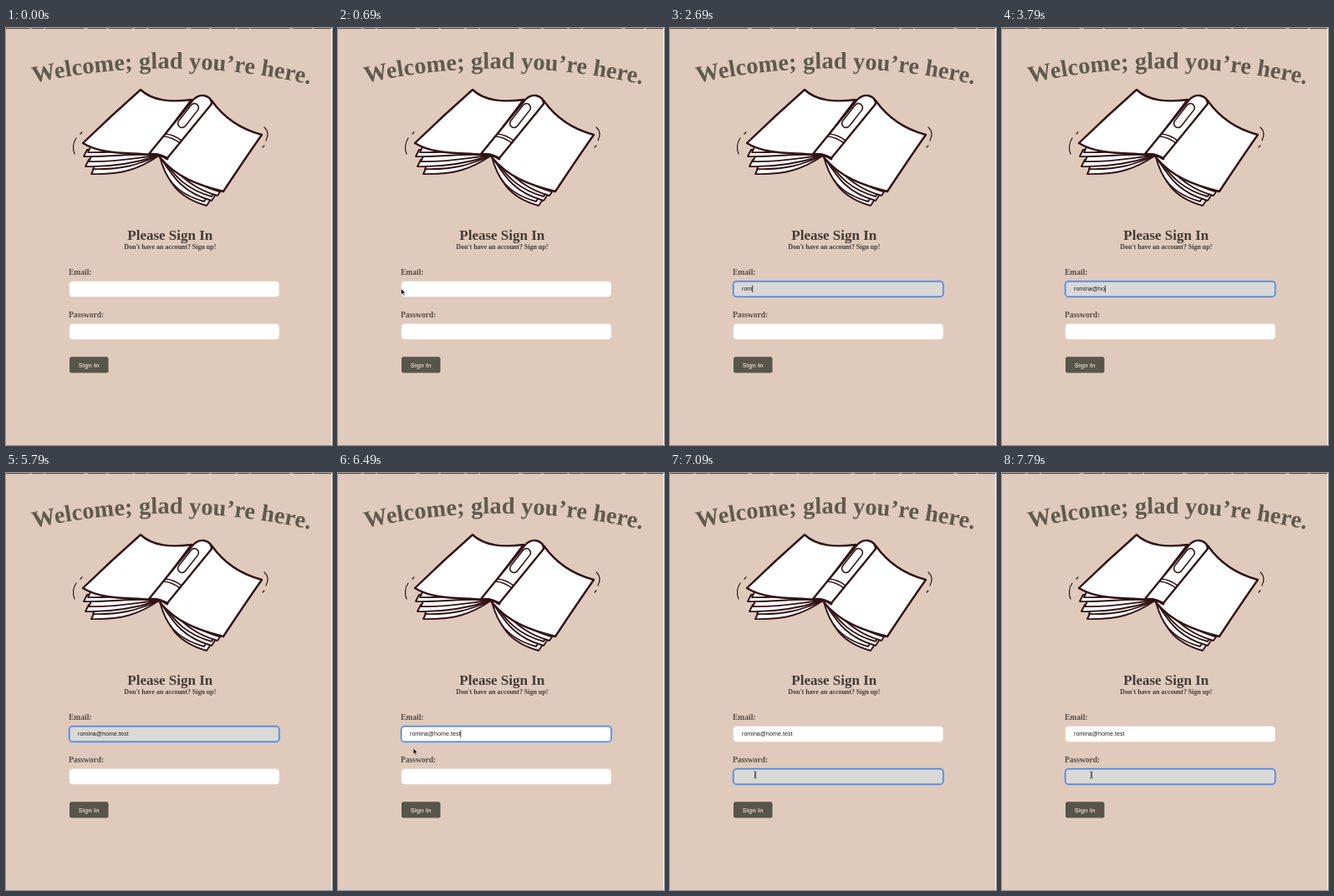
An HTML page that plays this animation: 390x500 px, repeating every 8 s.

```html
<!DOCTYPE html>
<html lang="en">
<head>
<meta charset="utf-8">
<title>Sign in</title>
<style>
  html, body { margin: 0; width: 100%; height: 100%; overflow: hidden; background: #dfcabc; }
  svg { display: block; width: 390px; height: 500px; }
  text { font-family: "Liberation Serif", "Times New Roman", serif; font-weight: 700; fill: #443d37; }
  .title { font-size: 28.3px; fill: #5f5a4d; letter-spacing: .1px; }
  .label { font-size: 9.5px; fill: #584e47; }
  .sans { font-family: "Liberation Sans", Arial, sans-serif; }
  .value { font-size: 7.15px; font-weight: 400; fill: #222; }
  .book { stroke: #321315; stroke-width: 2.4; stroke-linejoin: round; stroke-linecap: round; fill: #fff; }
  .line { fill: none; }
</style>
</head>
<body>
<svg viewBox="0 0 390 500">
  <defs><path id="arc" d="M33 66Q196 30 366 68"/></defs>
  <rect width="390" height="500" fill="#dfcabc"/>
  <path d="M0 .4H389" stroke="#9b8a80" stroke-width=".9"/>
  <path d="M0 .4H389" stroke="#4b3a33" stroke-width="1" stroke-dasharray="28 3 14 2 46 5 22 3"/>
  <rect x="389" width="1" height="500" fill="#fff"/>

  <text class="title"><textPath href="#arc">Welcome; glad you’re here.</textPath></text>

  <g class="book">
    <g id="stack" stroke-width="1.9"></g>
    <path d="M161 74C176 88 198 89 222 86L172 152C150 149 116 153 92 138Q126 105 161 74Z"/>
    <path d="M246 87C258 104 276 120 306 128Q285 158 260 196C228 188 203 178 184 155Z"/>
    <path d="M171 151L224 86Q230 80 237 81Q246 83 246 91L193 156Q182 150 171 151Z"/>
    <path class="line" stroke-width="3" d="M172 152Q183 150 193 157"/>
    <g stroke-width="1.6">
      <rect class="line" x="-17" y="-5" width="34" height="10" rx="5" transform="translate(218 105) rotate(-52)"/>
      <path class="line" d="M191 127Q201 128 210 135M189 130Q199 131 208 138"/>
    </g>
    <path class="line" stroke-width="1.2" d="M84 132Q78 141 82 151M89 127L91 125M309 119Q316 125 311 135M309 141L307 143"/>
  </g>

  <text x="196.3" y="253.6" font-size="17" text-anchor="middle">Please Sign In</text>
  <text x="196.3" y="265" font-size="7.95" text-anchor="middle">Don't have an account? Sign up!</text>

  <rect id="halo" x="75.2" width="252.2" height="19.6" rx="4.5" fill="none" stroke="#b4c3e4" stroke-width="2.4"/>
  <text class="label" x="75" y="296.3">Email:</text>
  <rect id="email" x="75.8" y="303.8" width="251" height="18.4" rx="4"/>
  <text class="label" x="75" y="347.3">Password:</text>
  <rect id="pass" x="75.8" y="354.8" width="251" height="18.4" rx="4"/>
  <text id="typed" class="sans value" x="86" y="315.2"></text>
  <rect id="caret" width=".8" height="8.4" fill="#111"/>

  <rect x="76" y="394.3" width="46.5" height="19.2" rx="2.5" fill="#57554a"/>
  <text class="sans" x="99.2" y="406.8" font-size="7.5" text-anchor="middle" style="fill:#dccbbe">Sign In</text>

  <path id="arrow" d="M0 0V7.2L1.7 5.7L2.9 8.4L4.1 7.9L2.9 5.2H5.2Z" fill="#111" stroke="#fff" stroke-width=".5"/>
  <path id="beam" d="M-1.6 -4Q0 -4 0 -3V3Q0 4 -1.6 4M1.6 -4Q0 -4 0 -3V3Q0 4 1.6 4M-.9 .9H.9" fill="none" stroke="#333" stroke-width=".8"/>
</svg>
<script>
const LOOP = 8000;
const ADDRESS = "romina@home.test";
const KEYS = [2390, 2490, 2690, 2890, 2990, 3090, 3290, 3590, 3690, 3990, 4090, 4190, 4490, 4790, 4990, 5290];
// time, x, y, pointer
const POINTER = [
  [0, 0, 0, ""], [100, 3, 314, "arrow"], [190, 18, 314, "arrow"], [290, 36, 314, "arrow"],
  [390, 52, 313, "arrow"], [490, 64, 313, "arrow"], [590, 72, 313, "arrow"], [690, 75.5, 312.5, "arrow"],
  [790, 83, 313, "beam"], [890, 88.5, 313, "beam"], [2390, 88.5, 313, ""],
  [6290, 88.5, 314, "beam"], [6390, 89, 320, "beam"], [6490, 90, 330, "arrow"], [6590, 92, 344, "beam"],
  [6690, 94, 355, "beam"], [6790, 98, 359, "beam"], [6890, 102, 362, "beam"],
  [7390, 104, 362, "beam"], [7590, 106, 362, "beam"], [7790, 107, 362, "beam"]
];
const CARET = [[990, 1490], [1990, 5790], [6290, 6790], [7190, 7690]];

const $ = id => document.getElementById(id);
const within = (t, a, b) => t >= a && t < b;
const show = (el, on) => el.setAttribute("visibility", on ? "visible" : "hidden");

// Loose pages, lowest first
const left = [[102, 175], [104, 169], [95, 166], [99, 160], [93, 154], [98, 149]];
const right = [[240, 213], [237, 208], [246, 207], [246, 202], [253, 201], [255, 196]];
$("stack").innerHTML = left.map(([x, y]) =>
  `<path d="M${x} ${y}C${x + 35} ${y + 1} 158 ${y - 5} 183 153L160 145L${x + 4} ${y - 8}Z"/>`
).join("") + right.map(([x, y]) =>
  `<path d="M184 154C${x - 47} ${y - 30} ${x - 36} ${y - 10} ${x} ${y}L${x + 6} ${y - 9}L205 155Z"/>`
).join("");

function styleField(el, hover, focus) {
  el.setAttribute("fill", hover ? "#d9d9d8" : "#fff");
  el.setAttribute("stroke", focus ? "#4272c2" : "#ece3dd");
  el.setAttribute("stroke-width", focus ? 1.2 : .5);
}

function draw(t) {
  const [, x, y, kind] = POINTER.filter(p => p[0] <= t).pop();
  for (const id of ["arrow", "beam"]) {
    $(id).setAttribute("transform", `translate(${x} ${y})`);
    show($(id), kind === id);
  }
  const inPass = t >= 7090;
  styleField($("email"), within(t, 790, 6490), within(t, 990, 7090));
  styleField($("pass"), t >= 6790, inPass);
  $("halo").setAttribute("y", inPass ? 354.2 : 303.2);
  show($("halo"), t >= 990);

  const typed = $("typed");
  const text = ADDRESS.slice(0, KEYS.filter(k => k <= t).length);
  if (typed.textContent !== text) typed.textContent = text;

  const width = inPass || !text ? 0 : typed.getComputedTextLength();
  $("caret").setAttribute("x", 86 + width);
  $("caret").setAttribute("y", inPass ? 359.6 : 308.6);
  show($("caret"), CARET.some(([a, b]) => within(t, a, b)));
}

const start = performance.now();
function tick() {
  draw((performance.now() - start) % LOOP);
  requestAnimationFrame(tick);
}
tick();
</script>
</body>
</html>
```
